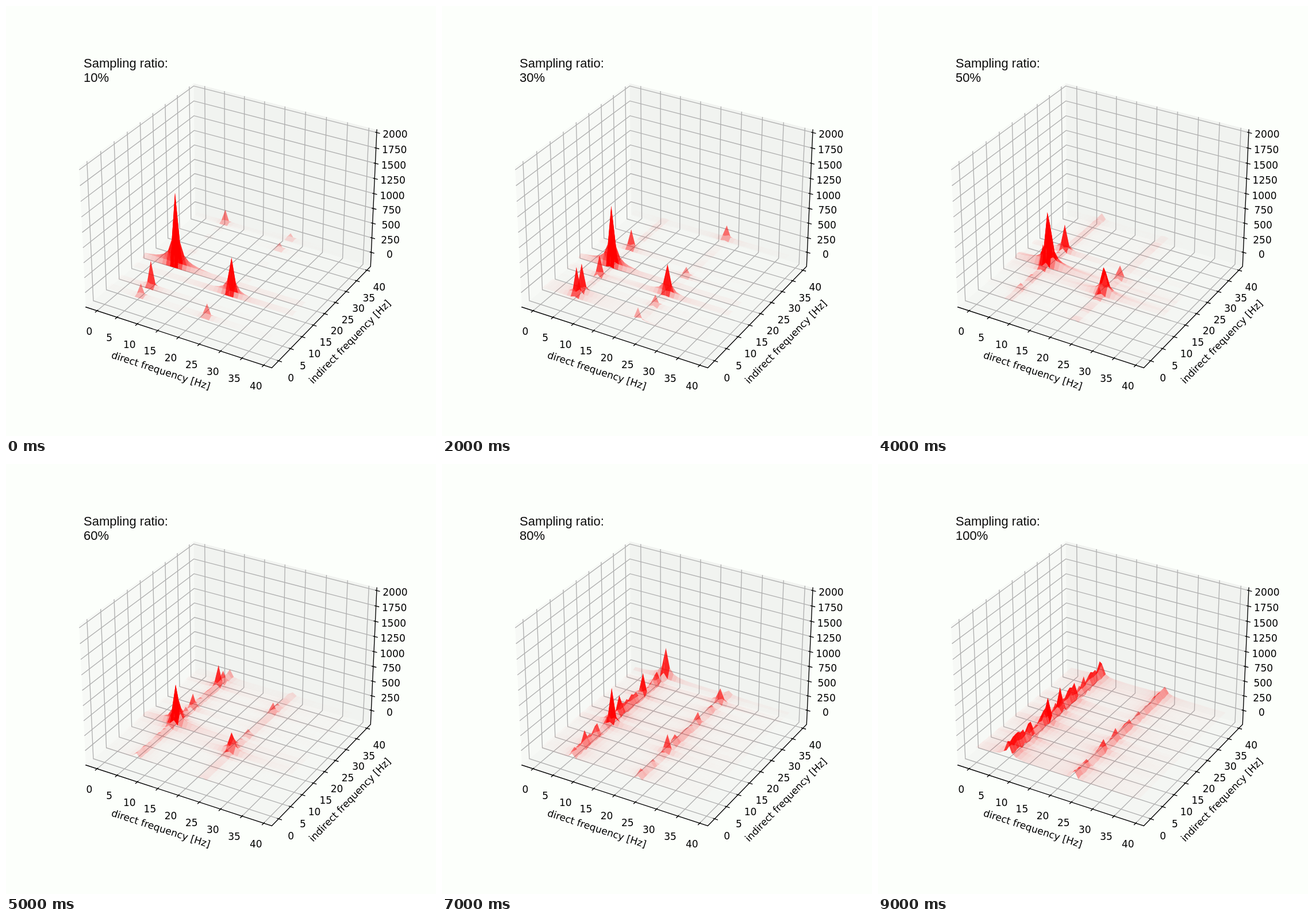
These frames come from a looping animation (748x748 px, 10 s). An HTML page:

```html
<!DOCTYPE html>
<html lang="en">
<head>
<meta charset="utf-8">
<title>Sampling ratio</title>
<style>
  html, body { margin: 0; width: 100%; height: 100%; overflow: hidden; background: #fcfffb; }
  svg { display: block; width: 100vw; height: 100vh; }
  .num { font: 17px "DejaVu Sans", sans-serif; text-anchor: middle; }
  .cap { font: 22px "Liberation Sans", Arial, sans-serif; fill: #0c0c0c; }
  .grid { fill: none; stroke: #b0b0b0; stroke-width: 1.36; }
  .axis { fill: none; stroke: #000; stroke-width: 1.36; stroke-linecap: square; }
  .tick { fill: none; stroke: #000; stroke-width: 1.36; }
</style>
</head>
<body>
<svg viewBox="0 0 748 748">
  <g id="frame"></g>
  <g id="surface" fill="#f00"></g>
  <text class="cap" x="135" y="107">Sampling ratio:</text>
  <text class="cap" x="135" y="132" id="ratio"></text>
</svg>
<script>
const STEP = 1000, SCENES = 10, N = 40;
const A = 0.59524, C = 0.44643;            // half size of the box
const SCALE = 3113.3, CX = 391.1, CY = 370;

// Perspective camera: azimuth -60, elevation 30, distance 10
function project(x, y, z) {
  const depth = 10 - (0.43301 * x - 0.75 * y + 0.5 * z);
  const u = 0.86603 * x + 0.5 * y;
  const v = -0.25 * x + 0.43301 * y + 0.86603 * z;
  return [CX + SCALE * u / depth, CY - SCALE * v / depth];
}

const hz = f => (f + 1.95) / 42.9 * 1.142857 - 0.571429;
const level = h => (h + 200) / 2200 * 0.857143 - 0.428571;
const str = p => p[0].toFixed(2) + ',' + p[1].toFixed(2);
const pts = list => list.map(p => str(project(...p))).join(' ');
const line = (cls, ...list) => `<polyline class="${cls}" points="${pts(list)}"/>`;
const pane = (fill, ...list) => `<polygon fill="${fill}" points="${pts(list)}"/>`;
const label = (s, [x, y], dx, dy) =>
  `<text class="num" x="${x + dx}" y="${y + dy + 6.2}">${s}</text>`;
const title = (s, x, y, turn) =>
  `<text class="num" y="4.5" transform="translate(${x} ${y}) rotate(${turn})">${s}</text>`;

function drawFrame() {
  const out = 0.0198, into = 0.0099;
  const panes = pane('#f7f9f6', [-A, -A, -C], [-A, A, -C], [-A, A, C], [-A, -A, C])
    + pane('#f1f3f0', [-A, A, -C], [A, A, -C], [A, A, C], [-A, A, C])
    + pane('#f4f6f3', [-A, -A, -C], [A, -A, -C], [A, A, -C], [-A, A, -C]);
  let grid = '', marks = '';
  for (let f = 0; f <= 40; f += 5) {
    const p = hz(f);
    grid += line('grid', [p, -A, -C], [p, A, -C], [p, A, C])
      + line('grid', [A, p, -C], [-A, p, -C], [-A, p, C]);
    marks += line('tick', [p, -A - out, -C], [p, -A + into, -C])
      + line('tick', [A + out, p, -C], [A - into, p, -C])
      + label(f, project(p, -A, -C), -13.5, 35.5)
      + label(f, project(A, p, -C), 21.5, 29.5);
  }
  for (let h = 0; h <= 2000; h += 250) {
    const z = level(h);
    grid += line('grid', [-A, -A, z], [-A, A, z], [A, A, z]);
    marks += line('tick', [A + out, A, z], [A - into, A, z])
      + label(h, project(A, A, z), 32, 3);
  }
  const axes = line('axis', [-A, -A, -C], [A, -A, -C], [A, A, -C], [A, A, C]);
  return panes + grid + axes + marks
    + title('direct frequency [Hz]', 269, 635.5, 18)
    + title('indirect frequency [Hz]', 599, 585, -45.8);
}

// Tallest peaks per sampling ratio: indirect frequency -> height
const peaks = {
  10: { 2: 208, 6: 440, 16: 1221, 37: 235 },
  30: { 2: 480, 4: 465, 11: 355, 16: 1005, 24: 335 },
  40: { 3: 585, 16: 690, 29: 625, 30: 530, 37: 330 },
  50: { 14: 430, 16: 900, 17: 650, 23: 450 },
  70: { 16: 418, 18: 330, 34: 715, 36: 365 },
  80: { 5: 285, 16: 600, 19: 375, 29: 410, 39: 510 },
  100: { 3: 290, 16: 435, 21: 440 }
};

function rand(n) {
  const s = Math.sin(n * 12.9898 + 4.137) * 43758.5453;
  return s - Math.floor(s);
}

// Tall peaks over noise that grows and fills in with the sampling ratio
function ridge(ratio) {
  const tall = peaks[ratio], d = ratio / 100;
  if (!tall) {
    const next = ridge(ratio + 10);
    return ridge(ratio - 10).map((h, y) => (h + next[y]) / 2);
  }
  return Array.from({ length: N }, (_, y) =>
    tall[y] || 90 * d * d + 220 * d * Math.pow(rand(y + ratio), 1 / d));
}

// Each row decays to both sides of its ridge
function spread(h, dist, noise) {
  const k = Math.min(0.35, 0.08 + 0.24 * (h / 800) ** 2 + noise);
  return dist ? h * k / dist : h;
}

// Two ridges; the second is half as high and four rows ahead, wrapping around
function heights(ratio) {
  const rows = ridge(ratio);
  const noise = rows.map((_, y) => 0.35 * ratio / 100 * rand(3 * y + ratio));
  return rows.map((h, y) => {
    const y2 = (y + 4) % N;
    return Array.from({ length: N }, (_, x) =>
      spread(h, Math.abs(x - 8), noise[y])
      + spread(rows[y2], Math.abs(x - 24), noise[y2]) / 2);
  });
}

function drawSurface(ratio) {
  const z = heights(ratio);
  const at = z.map((row, y) => row.map((h, x) => str(project(hz(x), hz(y), level(h)))));
  let s = '';
  for (let y = N - 2; y >= 0; y--) {
    for (let x = 0; x < N - 1; x++) {
      const mean = (z[y][x] + z[y][x + 1] + z[y + 1][x + 1] + z[y + 1][x]) / 4;
      const alpha = Math.min(1, mean / 240);
      if (alpha < 0.004) continue;
      const face = [at[y][x], at[y][x + 1], at[y + 1][x + 1], at[y + 1][x]];
      s += `<path fill-opacity="${alpha.toFixed(3)}" d="M${face.join('L')}Z"/>`;
    }
  }
  return s;
}

const surface = document.getElementById('surface');
const ratioText = document.getElementById('ratio');
let shown = -1;

function render(ms) {
  const scene = Math.floor(ms / STEP) % SCENES;
  if (scene === shown) return;
  shown = scene;
  const ratio = (scene + 1) * 10;
  surface.innerHTML = drawSurface(ratio);
  ratioText.textContent = ratio + '%';
}

document.getElementById('frame').innerHTML = drawFrame();
const start = performance.now();
function loop() {
  render(performance.now() - start);
  requestAnimationFrame(loop);
}
loop();
</script>
</body>
</html>
```
